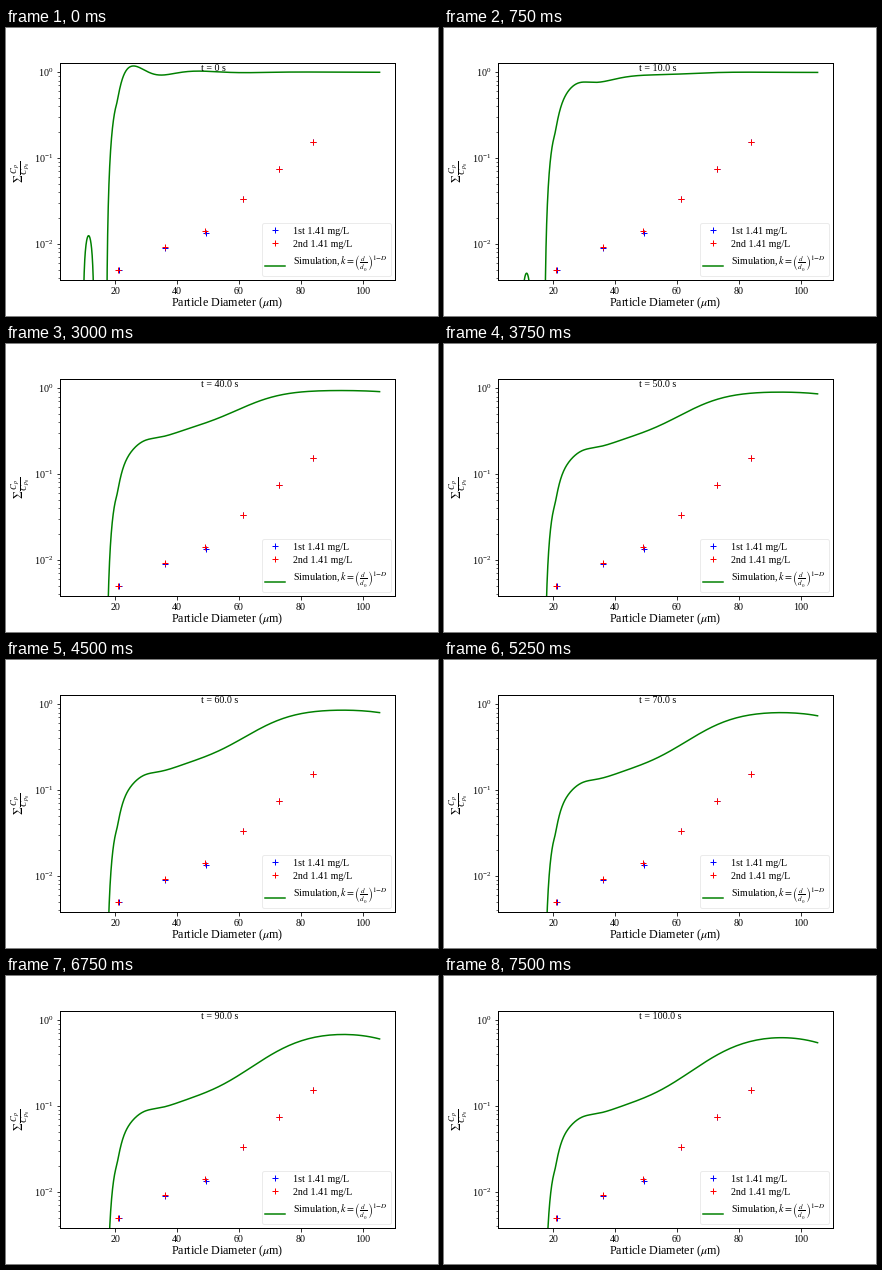
Animation of 432 by 288 pixels, one loop 8000 ms. Source, as a matplotlib script:

```python
import numpy as np
import matplotlib.pyplot as plt
from matplotlib.animation import FuncAnimation

plt.rcParams.update({
    "font.family": "Liberation Serif",
    "mathtext.fontset": "stix",
    "font.size": 10,
    "axes.linewidth": 1,
})

W, H, DPI = 432, 288, 72
LEFT, RIGHT, TOP, BOTTOM = 54, 388.8, 35, 252
UNIT_Y, DECADE = 44.2, 85.75      # pixel row of 10^0, pixels per decade
ROOT = 17.1                       # diameter where the main branch starts


def level(row):
    return 10 ** ((UNIT_Y - row) / DECADE)


def initial(d):
    """Steep rise from ROOT to one, then a damped ripple."""
    u = d - ROOT
    phase = np.maximum(np.sqrt(u) - 3.07, -1.25)
    ripple = 0.175 * np.exp(-0.72 * phase) * np.cos(np.pi * phase / 1.25)
    return (1 + ripple) * (1 - np.exp(-(u / 2.8) ** 1.94))


def removal(d, t):
    """Factor by which the concentration has dropped after t seconds."""
    d = np.maximum(d, 20)
    small = 1 / (1 + np.exp((d - 27) / 2.6))
    rate = 10 ** (0.56 + 0.464 * np.cos(np.pi * (d - 36.4) / 57.6) + 0.56 * small)
    growth = 0.0055 * t + 0.000045 * t**2
    power = 2 - small
    return (1 + (rate * growth) ** power) ** (1 / power)


def curve(t):
    lobe_d = np.linspace(9.54, 13.12, 80)
    lobe = 0.0124 * (1 - ((lobe_d - 11.33) / 1.8) ** 2) / removal(lobe_d, t) ** 1.2
    d = ROOT + np.geomspace(0.02, 105.5 - ROOT, 500)
    return (np.concatenate([lobe_d, [ROOT], d]),
            np.concatenate([lobe, [np.nan], initial(d) / removal(d, t)]))


fig = plt.figure(figsize=(W / DPI, H / DPI), dpi=DPI, facecolor="white")
ax = fig.add_axes([LEFT / W, 1 - BOTTOM / H, (RIGHT - LEFT) / W, (BOTTOM - TOP) / H])
ax.set_yscale("log")
ax.set_xlim(2.075, 110.425)
ax.set_ylim(level(BOTTOM), level(TOP))
ax.set_xlabel(r"Particle Diameter ($\mu$m)", fontsize=12, labelpad=0)
ax.set_ylabel(r"$\Sigma\,\frac{C_p}{C_{p_0}}$", fontsize=12, labelpad=1)

ax.plot([21.3, 36.1, 49.4, 61.4, 73.1, 84.1],
        [0.0049, 0.0089, 0.0133, 0.0329, 0.0752, 0.1518],
        "+", color="blue", label="1st 1.41 mg/L")
ax.plot([21.0, 36.1, 49.1, 61.4, 72.8, 83.8],
        [0.0049, 0.0091, 0.0139, 0.0329, 0.0752, 0.1518],
        "+", color="red", label="2nd 1.41 mg/L")
line, = ax.plot([], [], color="green",
                label=r"Simulation,$\,k = \left(\frac{d}{d_0}\right)^{1{-}D}$")
clock = ax.text(47.7, 1.02, "")

legend = ax.legend(loc="lower right", borderpad=0.33, borderaxespad=0.4,
                   labelspacing=0.4, edgecolor="0.9")
key = legend.legend_handles[-1]
key.set_ydata(np.asarray(key.get_ydata()) - 4.5)


def draw(i):
    t = 10 * (i // 3)
    line.set_data(*curve(t))
    clock.set_text(f"t = {float(t) if t else 0} s")
    return line, clock


anim = FuncAnimation(fig, draw, frames=32, interval=250, repeat=True)
plt.show()
```
